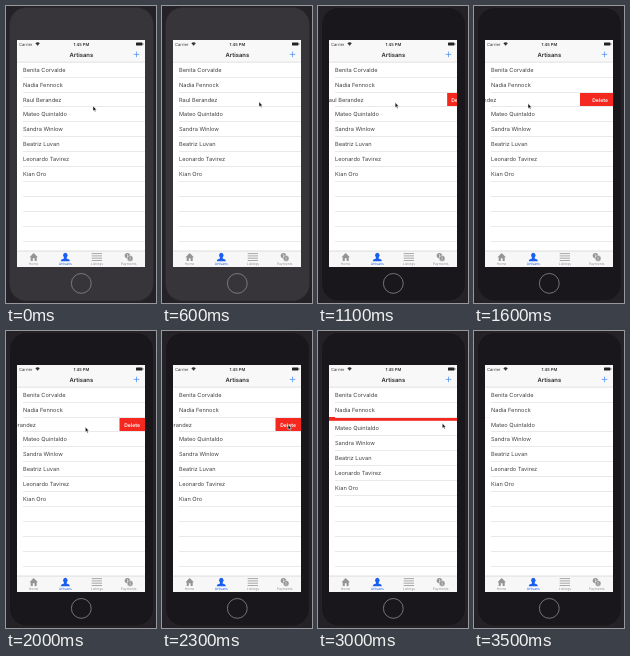
Write an HTML page that moves like this. It is 150 px wide and 297 px high and loops after 3700 ms.

```html
<!DOCTYPE html>
<html lang="en">
<head>
<meta charset="utf-8">
<style>
  html, body { margin: 0; width: 100%; height: 100%; overflow: hidden; background: #242226; }
  svg { display: block; width: 150px; height: 297px; font-family: Inter, "Liberation Sans", sans-serif; }
  text { text-rendering: geometricPrecision; }
  .name { font-size: 5.65px; fill: #434345; }
  .tab { font-size: 3.4px; text-anchor: middle; }
  .line { stroke: #e9e9ec; shape-rendering: crispEdges; }
</style>
</head>
<body>
<svg viewBox="0 0 150 297">
  <defs>
    <clipPath id="screenClip"><rect x="11" y="34" width="128" height="227"/></clipPath>
  </defs>
  <rect width="150" height="297" fill="#242226"/>
  <rect id="body" x="3.5" y="1.5" width="144" height="293.5" rx="17" stroke="#2c2a2e" stroke-width=".6"/>
  <circle cx="75.3" cy="277.4" r="9.9" fill="none" stroke="#8c8a8e" stroke-width=".8"/>

  <g clip-path="url(#screenClip)">
    <rect x="11" y="34" width="128" height="227" fill="#fff"/>
    <g id="swiped">
      <rect id="action" y="86" width="140" height="15" fill="#f5281f"/>
      <text id="actionLabel" y="95.6" font-size="5.1" font-weight="600" fill="#fff">Delete</text>
    </g>
    <g id="upper"></g>
    <g id="lower"><rect x="11" y="101" width="128" height="100" fill="#fff"/></g>
    <g id="blank"></g>

    <rect x="11" y="34" width="128" height="22" fill="#f8f8f8"/>
    <path d="M11 56.2H139" stroke="#c4c4c8" stroke-width=".5"/>
    <g font-size="4.1" fill="#333">
      <text x="13" y="39.5">Carrier</text>
      <text x="75.3" y="39.5" font-weight="600" text-anchor="middle">1:45 PM</text>
    </g>
    <path d="M29.4 37.3Q31.6 35.4 33.8 37.3L31.6 39.7Z" fill="#333"/>
    <rect x="130" y="36.4" width="6.4" height="3.2" rx=".7" fill="#222"/>
    <rect x="136.7" y="37.3" width=".6" height="1.4" fill="#222"/>
    <text x="75.3" y="50.7" font-size="5.85" font-weight="600" text-anchor="middle" fill="#2c2c2e">Artisans</text>
    <path d="M127.7 48.4H133.3M130.5 45.6V51.2" stroke="#4388f6" stroke-width=".7"/>

    <rect x="11" y="245" width="128" height="16" fill="#f7f7f7"/>
    <path d="M11 245H139" stroke="#bdbdc1" stroke-width=".5"/>
    <g fill="#949498">
      <path d="M23.5 251.2L27.7 247.1L31.9 251.2H30.7V255H28.6V252.3H26.8V255H24.7V251.2Z"/>
      <path d="M85.7 247.6H96M85.7 249.9H96M85.7 252.2H96M85.7 254.5H96" stroke="#949498" stroke-width=".8"/>
      <circle cx="121.4" cy="249.6" r="2.7"/>
      <circle cx="124.1" cy="252.4" r="2.9" stroke="#f7f7f7" stroke-width=".5"/>
      <path d="M121.4 248V251M124.1 250.9V253.9" stroke="#f7f7f7" stroke-width=".6"/>
    </g>
    <g fill="#1a5ff0">
      <ellipse cx="59.3" cy="249.3" rx="2.2" ry="2.6"/>
      <path d="M54.8 255.2Q54.8 253 58 252.4V250.5H60.6V252.4Q63.8 253 63.8 255.2Z"/>
    </g>
    <g id="tabs"></g>
  </g>
  <path id="cursor" d="M0 0V5L1.2 4L2 5.8L2.9 5.4L2.1 3.7H3.6Z" fill="#111" stroke="#fff" stroke-width=".45"/>
</svg>
<script>
const $ = id => document.getElementById(id);
const LOOP = 3700, STEP = 100, TOP = 56.2, ROW = 14.93, LEFT = 17, RIGHT = 139;
const SWIPED = 2, DRAG = 43, SLACK = 10, BUTTON = 25.5;
const names = ["Benita Corvalde", "Nadia Fennock", "Raul Berandez", "Mateo Quintaldo",
  "Sandra Winlow", "Beatriz Luvan", "Leonardo Tavirez", "Kian Oro"];

function add(parent, tag, attrs, text = "") {
  const el = document.createElementNS("http://www.w3.org/2000/svg", tag);
  for (const key in attrs) el.setAttribute(key, attrs[key]);
  el.textContent = text;
  return parent.appendChild(el);
}

function addLine(parent, row) {
  add(parent, "path", { class: "line", d: `M${LEFT} ${TOP + ROW * (row + 1)}H${RIGHT}` });
}

names.forEach((name, i) => {
  const parent = i === SWIPED ? $("swiped") : i < SWIPED ? $("upper") : $("lower");
  const label = add(parent, "text", { class: "name", x: LEFT, y: TOP + ROW * i + 9.5 }, name);
  if (i === SWIPED) label.id = "swipedName";
  addLine(parent, i);
});
for (let i = names.length - 1; i < 12; i++) addLine($("blank"), i);

["Home", "Artisans", "Listings", "Payments"].forEach((name, i) =>
  add($("tabs"), "text", { class: "tab", x: 27.6 + 31.7 * i, y: 259.1,
    fill: i === 1 ? "#1a5ff0" : "#949498" }, name));

const ramp = (t, from, to) => Math.min(1, Math.max(0, (t - from) / (to - from)));
const easeInOut = p => p * p * (3 - 2 * p);
const easeOut = p => 1 - (1 - p) ** 2;

function render(time) {
  const t = Math.floor(time % LOOP / STEP) * STEP;
  const approach = easeInOut(ramp(t, 0, 600));
  const drag = DRAG * ramp(t, 800, 1450);
  const settle = easeOut(ramp(t, 1700, 1900));
  const reach = easeInOut(ramp(t, 1800, 2300));
  const press = ramp(t, 2600, 2700);
  const slide = ramp(t, 2800, 3000);
  const collapse = easeOut(ramp(t, 2800, 3200));
  const leave = ramp(t, 3000, 3400);

  const pulled = Math.max(0, drag - SLACK);
  const shift = pulled + (BUTTON - pulled) * settle + (RIGHT - BUTTON) * slide;
  const edge = RIGHT - shift;
  const cursorX = 87 + 10 * approach - drag + 72 * reach - 1.7 * press + 8 * leave;
  const cursorY = 100 - 4.2 * approach + drag / 25 - 4 * reach - 1.3 * press;

  $("body").setAttribute("fill", t < 800 ? "#373539" : "#19171b");
  $("action").setAttribute("x", edge);
  $("actionLabel").setAttribute("x", Math.max(edge + 4, 118.2));
  $("swipedName").setAttribute("x", LEFT - shift);
  $("lower").setAttribute("transform", `translate(0 ${-ROW * collapse})`);
  $("cursor").setAttribute("transform", `translate(${cursorX} ${cursorY})`);
  $("cursor").setAttribute("visibility", t < 3500 ? "visible" : "hidden");
}

const start = performance.now();
function tick() {
  render(performance.now() - start);
  requestAnimationFrame(tick);
}
tick();
</script>
</body>
</html>
```
